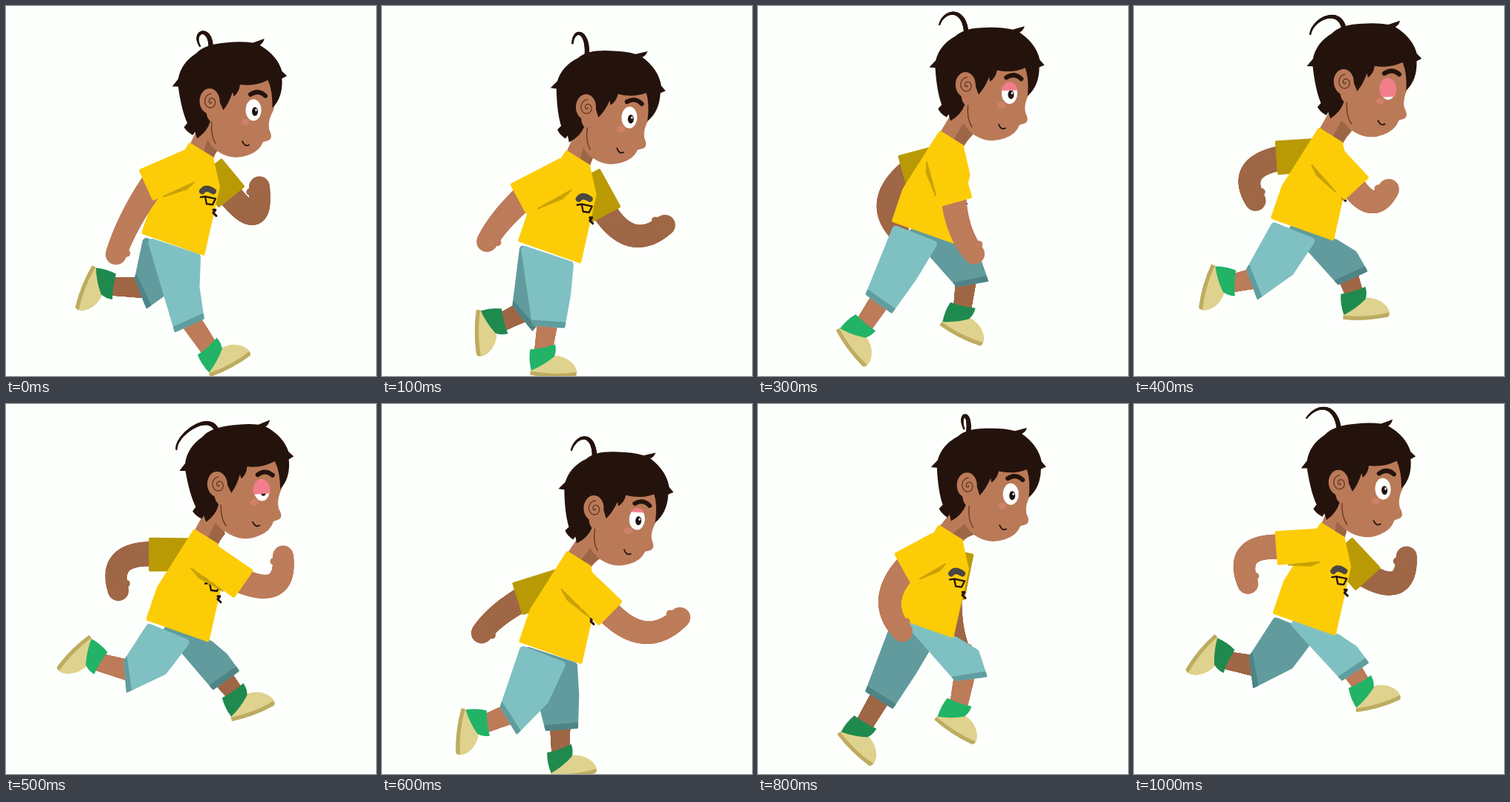
Recreate the animation shown at these times as an HTML page with a canvas. Size 498 px wide and 498 px high, loop 1100 ms.

```html
<!DOCTYPE html>
<html lang="en">
<head>
<meta charset="utf-8">
<title>Running child</title>
<style>
html, body { margin: 0; width: 100%; height: 100%; overflow: hidden; background: #fdfffc; }
canvas { display: block; }
</style>
</head>
<body>
<canvas id="stage" width="498" height="498"></canvas>
<script>
const ctx = document.getElementById('stage').getContext('2d');
const STEP = 100, POSES = 11, STRIDE = POSES / 2, TAU = Math.PI * 2;

const NEAR = { skin: '#bd7c5a', shirt: '#fccc07', pants: '#7fc1c2', cuff: '#619d9f', sock: '#22b366' };
const FAR = { skin: '#9f6746', shirt: '#b99a04', pants: '#619b9d', cuff: '#4e8486', sock: '#1f8a4e' };
const FACE = '#ba7a58', SHADE = '#9b6546', HAIR = '#24130c', INK = '#5b3220', FOLD = '#caa206';

// Key positions of one limb over a full cycle; the far limb runs half a cycle ahead.
const LIMB_AT = [0, .5, 2, 2.6, 4.9, 5.5, 6, 7.5, 8, 10.4];
// From the hip: trouser cuff x, y, ankle x, y, shoe angle
const LEG = [
  [26, 112, 60, 158, -25], [19, 106, 18, 152, -3], [-45, 95, -74, 148, 28], [-55, 102, -88, 146, 49],
  [-69, 64, -116, 30, 140], [-40, 69, -95, 52, 115], [-53, 94, -101, 95, 100], [25, 86, -10, 99, 72],
  [70, 73, 43, 122, 36], [73, 66, 88, 98, -17]
];
// From the neck: sleeve cuff x, y, hand x, y, elbow bend
const ARM = [
  [-75, 48, -115, 141, 2], [-83, 55, -131, 101, 3], [-74, 60, -98, 149, 0], [2, 89, 24, 168, 5],
  [52, 65, 106, 25, 27], [41, 64, 78, 50, 33], [43, 75, 136, 80, 25], [23, 85, 63, 123, 18],
  [-65, 49, -65, 134, 19], [-77, 23, -118, 68, 26]
];
// Twice per cycle: neck x, ear y, face tilt, hair tilt
const BODY_AT = [0, .5, 2, 2.6, 3.7, 5];
const BODY = [
  [263, 128, 0, -6], [265, 140, 3, 1], [260, 124, 0, 0],
  [259, 108, 0, -1], [264, 101, -2, -4], [269, 108, -4, -8]
];
// From the ear: tip of the tuft x, y, hook
const TUFT_AT = [0, 2, 3, 5, 6, 8, 10];
const TUFT = [[-14, -74, -13], [-24, -97, 16], [-36, -81, 7], [-56, -47, -1], [-31, -78, 7], [-5, -76, -9], [-44, -87, 17]];
const TORSO = [[-16, -10], [16, 10], [25, 50], [4, 143], [-81, 113], [-66, 69]];

const mix = (a, b, t) => a.map((v, i) => v + (b[i] - v) * t);
const add = (a, b, k = 1) => [a[0] + b[0] * k, a[1] + b[1] * k];
const polar = a => [Math.cos(a), Math.sin(a)];
const heading = (a, b) => Math.atan2(b[1] - a[1], b[0] - a[0]);
const toward = (a, b, d) => add(a, polar(heading(a, b)), d);

// Eased value between the keys of a repeating track
function track(times, rows, period, time) {
  const at = time % period;
  const i = times.findLastIndex(t => t <= at), next = (i + 1) % times.length;
  const t = (at - times[i]) / ((next ? times[next] : period) - times[i]);
  return mix(rows[i], rows[next], t * t * (3 - 2 * t));
}

function poly(points, color, r = 2) {
  const n = points.length;
  ctx.beginPath();
  ctx.moveTo(...mix(points[0], points[n - 1], .5));
  points.forEach((p, i) => ctx.arcTo(...p, ...points[(i + 1) % n], r));
  ctx.closePath();
  ctx.fillStyle = color;
  ctx.fill();
}

function oval(x, y, rx, ry, color) {
  ctx.beginPath();
  ctx.ellipse(x, y, rx, ry, 0, 0, TAU);
  ctx.fillStyle = color;
  ctx.fill();
}

function shape(d, color) {
  ctx.fillStyle = color;
  ctx.fill(new Path2D(d));
}

function line(d, color, width) {
  ctx.strokeStyle = color;
  ctx.lineWidth = width;
  ctx.lineCap = ctx.lineJoin = 'round';
  ctx.stroke(new Path2D(d));
}

// Tapered stroke along a bezier of any degree
function tube(points, r0, r1, color) {
  for (let i = 0; i <= 60; i++) {
    const t = i / 60, r = r0 + (r1 - r0) * t;
    let p = points;
    while (p.length > 1) p = p.slice(1).map((q, j) => mix(p[j], q, t));
    oval(...p[0], r, r, color);
  }
}

function placed([x, y], degrees, draw) {
  ctx.save();
  ctx.translate(x, y);
  ctx.rotate(degrees * TAU / 360);
  draw();
  ctx.restore();
}

function leg(hip, time, look) {
  const [cx, cy, fx, fy, angle] = track(LIMB_AT, LEG, POSES, time);
  const cuff = add(hip, [cx, cy]), foot = add(hip, [fx, fy]);
  const thigh = heading(hip, cuff), shin = (heading(cuff, foot) + TAU) % TAU;
  const across = polar((thigh + shin) / 2 - TAU / 4);
  const front = add(cuff, across, 22), back = add(cuff, across, -22);
  const hipFront = add(hip, [36 + cx * .2, 16]), hipBack = add(hip, [Math.max(0, cx) * .15 - 36, -8]);
  const knee = add(mix(hipFront, front, .5), polar(thigh - TAU / 4), (shin - thigh) * 10);
  const ankle = add(foot, polar((angle - 90) * TAU / 360), 17);

  tube([mix(cuff, hip, .12), ankle], 14, 12, look.skin);
  placed(foot, angle, () => {
    shape('M-14 8L13 -11Q30 -12 41 -2Q51 8 45 15Q15 21 -15 18Z', '#dfd28e');
    shape('M-15 13Q18 16 47 9Q48 14 45 15Q15 21 -15 18Z', '#bdac60');
    shape('M-18 -16Q0 -19 15 -26Q18 -17 15 -9Q2 4 -14 12Q-19 -2 -18 -16Z', look.sock);
  });
  poly([hipBack, hipFront, knee, front, back], look.pants, 5);
  poly([front, back, toward(back, hipBack, 8), toward(front, knee, 8)], look.cuff, 1);
}

function arm(neck, shoulder, time, look) {
  const [cx, cy, hx, hy, bend] = track(LIMB_AT, ARM, POSES, time);
  const cuff = add(neck, [cx, cy]), hand = add(neck, [hx, hy]);
  const out = polar(heading(cuff, hand) + TAU / 4);
  const elbow = add(mix(cuff, hand, .5), out, bend * 2);
  tube([mix(shoulder, cuff, .8), elbow, hand], 17, 14, look.skin);
  const fore = heading(elbow, hand);
  oval(...add(add(hand, polar(fore), -6), polar(fore - TAU / 4), 13), 5, 5, look.skin);

  const aim = heading(shoulder, cuff);
  const under = polar(aim + (cuff[0] < shoulder[0] ? -1 : 1) * TAU / 4);
  const hem = add(cuff, under, 23), pit = add(shoulder, under, 22);
  poly([add(shoulder, under, -22), add(cuff, under, -23), hem, pit], look.shirt);
  if (look === NEAR) poly([hem, add(mix(hem, pit, .7), under, 6), pit, mix(hem, pit, .5)], FOLD, 1);
}

function shirtFace(at) {
  placed(at, 0, () => {
    line('M-9 -12Q-4 -19 6 -12', '#4a4642', 8);
    line('M-11 -4L-5 -5L9 -2L5 6L-3 5L-5 -5', HAIR, 2.3);
    line('M6 13L9 13L6 17L10 21', HAIR, 3);
  });
}

function drawHead(ear, faceTilt, hairTilt, time) {
  const [tx, ty, hook] = track(TUFT_AT, TUFT, POSES, time);
  const lid = Math.max(0, 1 - Math.abs(time - 4.3) / 2.1);
  placed(ear, faceTilt, () =>
    shape('M-8 -5L60 -35L92 -28L85 12Q77 26 79 38Q85 50 78 53L71 55Q66 68 50 73Q30 80 12 69Q-8 58 -8 28Z', FACE));
  placed(ear, 0, () =>
    tube([[tx, ty], [tx + hook, ty - 22], [tx * .2 + 8, -104], [0, -64]], 1.2, 3.4, HAIR));
  placed(ear, hairTilt, () => shape(
    'M-49 -25L-40 -34Q-34 -55 -12 -66Q0 -77 30 -76Q50 -76 65 -72L81 -76Q79 -70 74 -68Q96 -52 100 -30' +
    'L106 -23L99 -20Q98 5 82 18Q85 -5 80 -20Q62 -13 42 -18Q40 -8 32 -3L31 -9Q25 5 16 14L10 -5L-10 0' +
    'L-6 22L-3 27Q-8 40 -23 48L-25 39L-28 43Q-36 38 -39 31L-34 26Q-40 8 -41 -24Z', HAIR));
  placed(ear, faceTilt, () => {
    oval(-1, 0, 13.5, 17, FACE);
    let spiral = 'M1 1';
    for (let a = 0; a < 11; a += .2) {
      const [u, v] = polar(a);
      spiral += `L${1 + u * a * .9} ${1 + v * a}`;
    }
    line(spiral, INK, 1.2);
    line('M2 28Q0 46 7 57', INK, 1.2);
    oval(47, 28, 5.5, 4.5, '#d0806a');
    line('M43 54Q46 62 52 59', HAIR, 1.8);
    line('M54 -9Q65 -16 74 -7', HAIR, 6);
    oval(58, 12, 10.5, 14.5, '#fff');
    oval(60, 14, 4, 6, '#1c1210');
    oval(61.5, 12, 1.2, 1.8, '#fff');
    if (lid) {
      ctx.beginPath();
      ctx.rect(40, -5, 36, 2 + 30 * lid);
      ctx.clip();
      oval(58, 12, 11.5, 15, '#f27d8b');
    }
  });
}

function draw(time) {
  const [neckX, earY, faceTilt, hairTilt] = track(BODY_AT, BODY, STRIDE, time);
  const wave = shift => Math.cos(TAU * (time - shift) / POSES);
  const ear = [280.5 - 5.5 * wave(.3), earY];
  const neck = [neckX, earY + 67 + 4.5 * wave(3.4)];
  const hip = add(neck, [-42, 125]);
  const torso = TORSO.map(p => add(neck, p));

  ctx.fillStyle = '#fdfffc';
  ctx.fillRect(0, 0, 498, 498);
  arm(neck, add(neck, [10, 25]), time + STRIDE, FAR);
  leg(hip, time + STRIDE, FAR);
  leg(hip, time, NEAR);
  poly([add(ear, [-9, 20]), add(torso[0], [0, 4]), add(torso[1], [0, 3]), add(ear, [10, 62])], FACE);
  poly([add(ear, [-4, 52]), add(ear, [10, 66]), torso[1], mix(torso[0], torso[1], .6)], SHADE, 1);
  poly(torso, NEAR.shirt);
  shirtFace(add(torso[2], [-15, 18]));
  arm(neck, add(neck, [-13, 20]), time, NEAR);
  drawHead(ear, faceTilt, hairTilt, time);
}

const start = performance.now();
function tick() {
  draw(Math.floor((performance.now() - start) / STEP) % POSES);
  requestAnimationFrame(tick);
}
tick();
</script>
</body>
</html>
```
